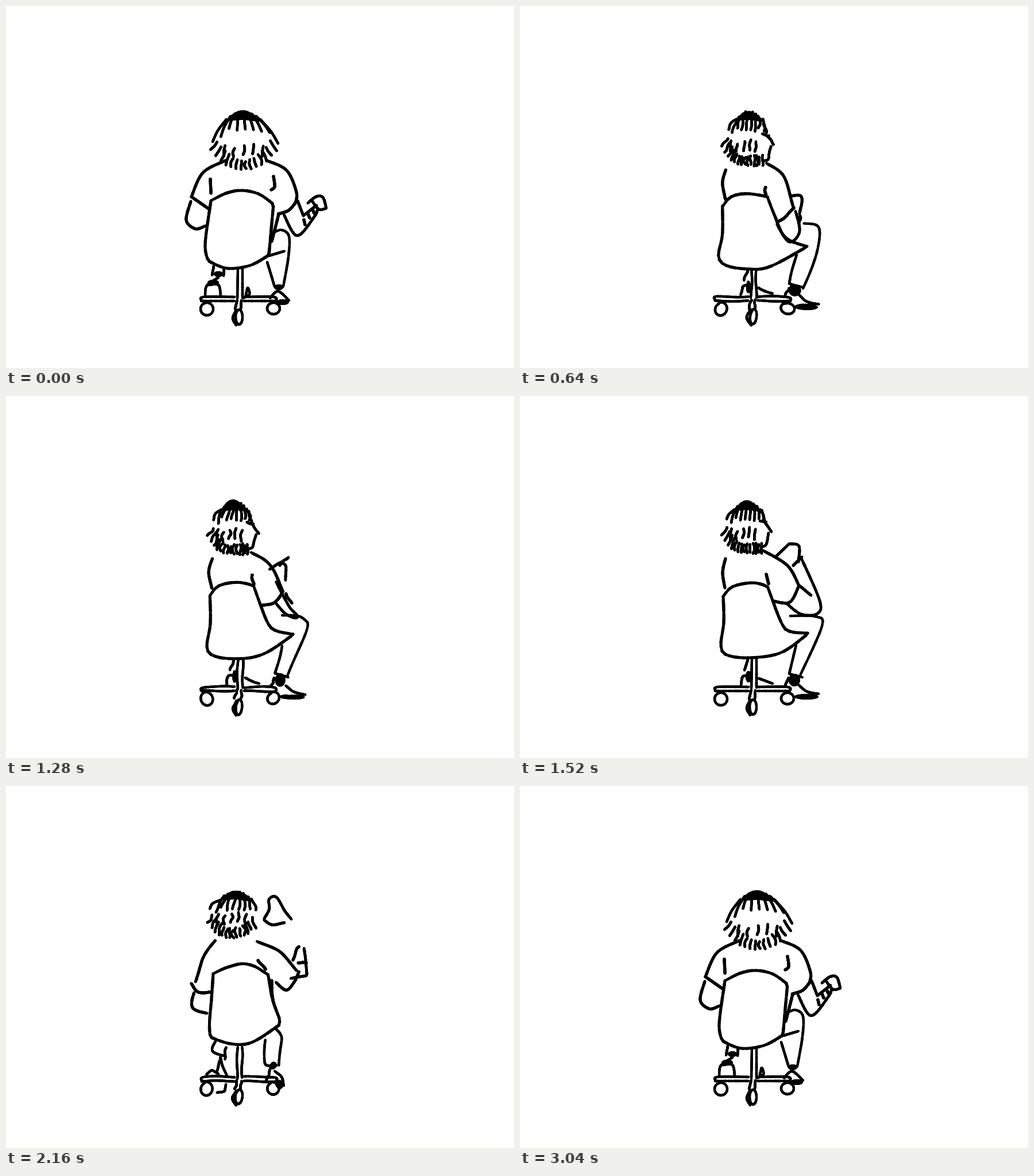
An HTML page with a canvas for the animation above (3.12 s loop, 885 px wide and 632 px high).

```html
<!DOCTYPE html>
<html lang="en">
<head>
<meta charset="utf-8">
<title>Swivel chair</title>
<style>
  html, body { margin: 0; width: 100%; height: 100%; overflow: hidden; background: #fff; }
  canvas { display: block; }
</style>
</head>
<body>
<canvas id="stage" width="885" height="632"></canvas>
<script>
const ctx = document.getElementById('stage').getContext('2d');
const STEP = 80, STEPS = 39, SAMPLES = 60;

const mix = (a, b, u) => a + (b - a) * u;
const rand = n => { const v = Math.sin(n * 12.9898) * 43758.5453; return v - Math.floor(v); };

// Catmull-Rom curve; a doubled point makes a corner.
function smooth(pts) {
  const out = [pts[0]];
  for (let i = 0; i < pts.length - 1; i++) {
    const b = pts[i], c = pts[i + 1], a = pts[i - 1] || b, d = pts[i + 2] || c;
    if (b[0] === c[0] && b[1] === c[1]) continue;
    for (let t = 0.1; t < 1.05; t += 0.1) {
      out.push([0, 1].map(j => {
        const linear = (c[j] - a[j]) * t;
        const square = (2 * a[j] - 5 * b[j] + 4 * c[j] - d[j]) * t * t;
        const cube = (3 * b[j] - a[j] - 3 * c[j] + d[j]) * t * t * t;
        return b[j] + (linear + square + cube) / 2;
      }));
    }
  }
  return out;
}

// Even spacing gives every stroke the same number of points, so any two can morph.
function resample(pts) {
  const len = [0];
  for (let i = 1; i < pts.length; i++) {
    len.push(len[i - 1] + Math.hypot(pts[i][0] - pts[i - 1][0], pts[i][1] - pts[i - 1][1]));
  }
  let i = 1;
  return Array.from({ length: SAMPLES }, (_, k) => {
    const at = len[len.length - 1] * k / (SAMPLES - 1);
    while (i < len.length - 1 && len[i] < at) i++;
    const u = (at - len[i - 1]) / (len[i] - len[i - 1]);
    return [mix(pts[i - 1][0], pts[i][0], u), mix(pts[i - 1][1], pts[i][1], u)];
  });
}

const stroke = (pts, solid = false) => ({ solid, pts: resample(smooth(pts)) });

function oval([x, y], [rx, ry], solid) {
  return stroke(Array.from({ length: 17 }, (_, k) => {
    const a = k * Math.PI / 8 - 2;
    return [x + rx * Math.cos(a), y + ry * Math.sin(a)];
  }), solid);
}

// Strokes are split by "/"; "o" is an outlined oval and "d" a solid one: centre, radii.
function parse(text) {
  return text.split('/').filter(Boolean).map(s => {
    const pts = s.replace(/^[od]/, '').split(' ').map(p => p.split(',').map(Number));
    return /^[od]/.test(s) ? oval(pts[0], pts[1], s[0] === 'd') : stroke(pts);
  });
}

const shift = (text, dx, dy) => text.replace(/(\d+),(\d+)/g, (_, x, y) => `${+x + dx},${+y + dy}`);
const face = (dx, dy) => shift('425,205 430,222/422,224 433,226/430,226 436,234 442,243/437,245 433,265 425,269', dx, dy);
const sideLegs = (thigh, toe) => `${thigh}/481,435 469,485 469,485 492,491/d478,496 9,10/486,505 500,516 ${toe},520`
  + `/d${toe - 21},525 20,4/468,492 462,505/397,460 391,479/398,488 388,490 385,505/416,493 440,502/d398,490 4,9`;

const base = parse('341,515 344,508 398,508/340,515 398,515/414,508 466,508 470,515/414,515 468,515'
  + '/404,457 403,511/412,455 412,509/403,513 399,529/410,514 409,529'
  + '/o350,529 11,11/o466,528 11,10/401,531 395,545 401,557/o406,543 6,13');

// hair: cap left and right, strand ends left and right, side drop,
// locks left and right, lowest lock, lift of the left and right side.
const away = {
  legs: '465,396 480,391 493,402 492,438 483,490/455,447 468,490/d475,491 7,4/460,510 474,498 493,514/d482,517 10,4/458,436 485,428/362,454 359,470/380,457 379,471/370,474 350,488 347,505/d361,483 9,4/353,487 370,487 374,505/d370,468 7,4/418,505 421,492 424,504 412,510',
  body: '382,270 343,291 323,333/455,270 489,287 506,325 504,344/466,297 468,315 462,321/504,344 492,357 474,363/323,333 353,354/322,341 314,374 330,389 347,384/475,364 463,411/356,302 357,327',
  chair: '357,340 383,327 410,322 440,328 466,346 466,346 458,435 458,435 425,453 385,458 352,445 352,445 347,415 357,340',
  arm: '484,364 507,401 537,368 543,353/508,340 518,366 518,366 541,348/526,344 540,333 552,334 558,353 558,353 545,355 533,340/519,373 521,382/526,362 529,370/534,355 537,362',
  face: '',
  hair: [384, 443, 360, 474, 25, 362, 466, 278, 34, 34]
};

const seated = {
  legs: sideLegs('495,380 521,386 518,425 493,493', 520),
  body: '358,287 354,310 357,337/430,274 458,296 477,352/427,316 428,328/477,353 464,365 449,376',
  chair: '354,350 368,333 395,327 431,332 431,332 443,364 462,404 500,420 500,420 435,456 395,460 360,454 347,438 354,400 354,350',
  arm: '480,357 487,395 470,412 448,380/488,365 486,380/475,331 490,332 488,364',
  face: face(0, 0),
  hair: [376, 422, 362, 424, 3, 356, 423, 270, 32, 0]
};

const raising = {
  legs: sideLegs('471,384 515,385 526,402 488,488', 520),
  body: '358,284 353,308 357,335/424,270 466,296 486,331/429,311 433,328/486,331 470,360 441,358',
  chair: '354,350 370,333 405,326 431,332 431,332 455,395 470,411 503,414 503,414 455,448 400,457 360,452 350,435 355,395 354,350',
  arm: '464,362 490,381 518,380 522,357 490,283/488,332 507,348/446,280 469,258 469,258 486,262 485,290/476,296 491,281',
  face: face(-4, -6),
  hair: [374, 418, 360, 424, 3, 356, 421, 266, 30, 0]
};

const drinking = {
  legs: sideLegs('463,379 512,373 512,373 531,395 502,486', 508),
  body: '366,272 358,328/424,266 485,277/431,309 429,319/487,279 496,312/496,312 462,342 457,370/467,319 456,338',
  chair: '357,335 380,323 415,319 441,326 441,326 458,378 473,403 516,411 516,411 450,444 405,454 365,452 349,430 354,385 357,335',
  arm: '502,307 530,289 530,289 499,234/498,278 513,280/450,232 459,215 458,197 470,193 484,217 497,233/486,278 486,237/450,234 463,242 485,240',
  face: face(-6, -11),
  hair: [372, 416, 352, 421, 5, 360, 419, 264, 28, 4]
};

const reaching = {
  legs: '466,430 468,488/446,446 446,485 468,488/d462,487 6,4/464,496 474,505 478,525/d474,520 3,9/458,496 450,522/357,444 352,462 378,470/380,450 380,470/364,474 353,490 349,502/372,474 383,505/349,503 358,498 370,503/367,534 381,533 383,520',
  body: '364,271 337,302 323,346/442,272 482,293 513,334/442,304 459,322/515,336 505,358 488,372 463,350/323,346 336,360 357,359/328,362 326,387 350,397/462,340 467,392',
  chair: '361,326 390,314 418,309 459,324 459,324 470,418 470,418 425,448 390,449 354,434 354,434 361,326',
  arm: '488,374 525,389 525,389 543,344/521,346 536,346/520,309 538,315 557,309 557,309 562,335 546,343/517,333 530,325 542,333',
  face: '',
  hair: [374, 430, 356, 438, 0, 354, 434, 256, 25, 22]
};

// sweep: how far the cup arm swings out on the way; lead: how much the body runs ahead of it.
const keys = [
  { step: 0, pose: away, sweep: 75 },
  { step: 4, pose: seated },
  { step: 12, pose: seated },
  { step: 19, pose: raising },
  { step: 23, pose: drinking, lead: 1.8 },
  { step: 32, pose: reaching, sweep: 15 },
  { step: 38, pose: away }
];

const parts = ['legs', 'base', 'body', 'chair', 'arm', 'hair', 'face'];
const widths = { body: 5, chair: 5.2, arm: 4.8 };

for (const { pose } of keys) {
  pose.base = base;
  for (const part of parts) if (typeof pose[part] === 'string') pose[part] = parse(pose[part]);
}

function hairStrokes([capL, capR, endL, endR, drop, lockL, lockR, low, liftL, liftR]) {
  const cap = (t, y) => [mix(capL, capR, t), y];
  const out = [stroke([cap(0, 200), cap(0.28, 186), cap(0.6, 184), cap(1, 200), cap(0.5, 198), cap(0, 200)], true)];
  for (let i = 0; i < 9; i++) {
    const t = i / 8, side = 2 * t - 1;
    const x = mix(capL, capR, t), y = 185 + 13 * side * side;
    const endX = mix(endL, endR, t), endY = 212 + 9 * rand(i) + drop * side ** 4;
    out.push(stroke([[x, y], [(x + endX) / 2 + 3 * side, (y + endY) / 2], [endX, endY]]));
  }
  const lock = (x, y, lean, seed) => {
    const bend = 6 * rand(seed) - 3, half = 6 + 4 * rand(seed + 0.5);
    out.push(stroke([[x - lean / 2, y - half], [x + bend, y], [x + lean / 2, y + half]]));
  };
  for (let i = 0; i < 14; i++) {
    const side = i / 6.5 - 1, lift = side < 0 ? liftL : liftR;
    lock(mix(lockL, lockR, i / 13), low - lift * side * side, lift * side / 3, i + 20);
  }
  for (let i = 0; i < 5; i++) {
    lock(mix(lockL, lockR, 0.18 + i * 0.16), low - 30 + 8 * rand(i + 40), -2, i + 50);
  }
  return out;
}

// Strokes that are far apart or unlike are swapped instead of morphed.
function blend(a, b, u) {
  const far = !a || !b || a.solid !== b.solid
    || Math.hypot(a.pts[30][0] - b.pts[30][0], a.pts[30][1] - b.pts[30][1]) > 115;
  if (far) return u < 0.5 ? a : b;
  return { solid: a.solid, pts: a.pts.map((p, i) => p.map((v, j) => mix(v, b.pts[i][j], u))) };
}

// In-between drawings wobble a little, as if redrawn by hand.
function shiver(pts, seed, amount) {
  const phase = rand(seed) * 6.3, dx = rand(seed + 1) - 0.5, dy = rand(seed + 2) - 0.5;
  return pts.map(([x, y], i) => [
    x + amount * (dx + 0.6 * Math.sin(phase + i * 0.1)),
    y + amount * (dy + 0.6 * Math.cos(phase + i * 0.08))
  ]);
}

function trace(pts) {
  ctx.beginPath();
  pts.forEach(p => ctx.lineTo(p[0], p[1]));
}

function brush(pts, width, seed) {
  for (let i = 1; i < pts.length; i++) {
    ctx.lineWidth = width * (0.92 + 0.16 * rand(seed + i));
    trace([pts[i - 1], pts[i]]);
    ctx.stroke();
  }
}

function draw(step) {
  const next = keys.findIndex(k => k.step > step);
  const from = next < 0 ? keys[0] : keys[next - 1], to = next < 0 ? keys[0] : keys[next];
  const u = next < 0 ? 0 : (step - from.step) / (to.step - from.step);
  const swing = (from.sweep || 0) * Math.sin(Math.PI * u);

  ctx.fillStyle = '#fff';
  ctx.fillRect(0, 0, 885, 632);
  ctx.strokeStyle = '#000';
  ctx.lineCap = ctx.lineJoin = 'round';

  parts.forEach((part, p) => {
    const v = part === 'arm' ? u : Math.min(1, u * (from.lead || 1));
    let a = from.pose[part], b = to.pose[part];
    if (part === 'hair') a = b = hairStrokes(a.map((n, i) => mix(n, b[i], v)));
    for (let i = 0; i < Math.max(a.length, b.length); i++) {
      const shape = blend(a[i], b[i], v);
      if (!shape) continue;
      let pts = shiver(shape.pts, step * 31 + p * 17 + i * 3, u ? 1.5 : 0);
      if (part === 'arm') {
        pts = pts.map(([x, y]) => [x + swing * Math.min(1, Math.max(0, (x - 480) / 55)), y]);
      }
      if (shape.solid || part === 'chair') {
        ctx.fillStyle = shape.solid ? '#000' : '#fff';
        trace(pts);
        ctx.fill();
      }
      brush(pts, shape.solid ? 2 : widths[part] || 4.4, p * 50 + i);
    }
  });
}

let shown = -1;
function tick() {
  const step = Math.floor(performance.now() / STEP) % STEPS;
  if (step !== shown) draw(shown = step);
  requestAnimationFrame(tick);
}
tick();
</script>
</body>
</html>
```
